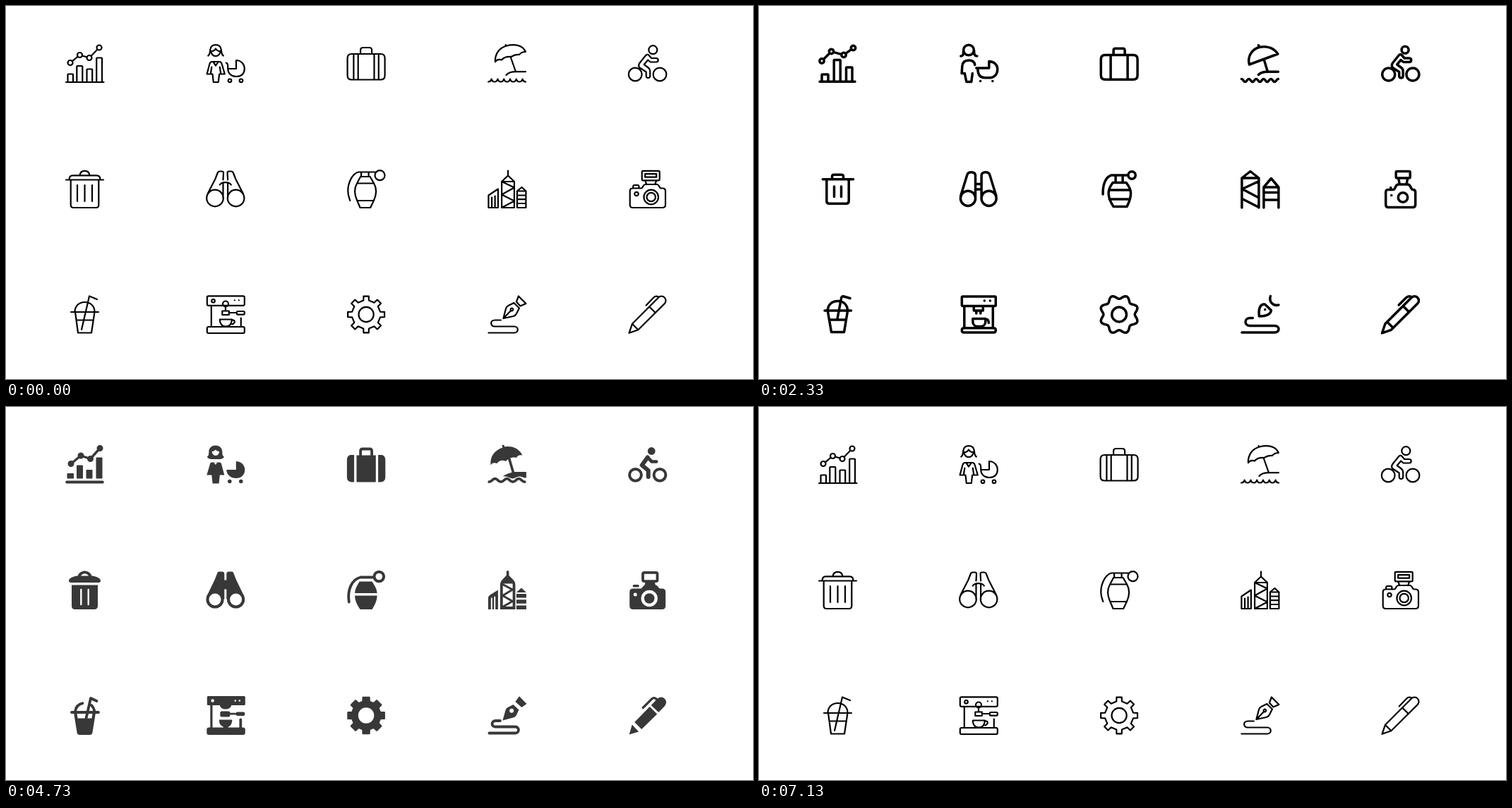
An HTML page with a canvas for the animation above (7.4 s loop, 1058x529 px).

```html
<!DOCTYPE html>
<html lang="en">
<head>
<meta charset="utf-8">
<title>Icon styles</title>
<style>
html, body { margin: 0; width: 100%; height: 100%; overflow: hidden; background: #fff; }
canvas { display: block; }
</style>
</head>
<body>
<canvas id="stage" width="1058" height="529"></canvas>
<script>
const ctx = document.getElementById('stage').getContext('2d');

// Path helpers; every icon lives in a 56 x 56 box
const o = (x, y, r) => `M${x - r} ${y}a${r} ${r} 0 1 0 ${2 * r} 0a${r} ${r} 0 1 0 ${-2 * r} 0z`;
const dot = (x, y) => `M${x} ${y}h.1`;
const box = (x, y, w, h, r = 0) =>
  `M${x + r} ${y}h${w - 2 * r}q${r} 0 ${r} ${r}v${h - 2 * r}q0 ${r} ${-r} ${r}h${2 * r - w}q${-r} 0 ${-r} ${-r}v${2 * r - h}q0 ${-r} ${r} ${-r}z`;
const bar = (x, top, w, bottom) => box(x, top, w, bottom - top, 0.8);

// Ringed points joined by lines that stop at the rings
function chain(r, pts) {
  return pts.map(([x, y], i) => {
    let d = o(x, y, r);
    if (i) {
      const [px, py] = pts[i - 1], len = Math.hypot(x - px, y - py);
      const ux = (x - px) / len * r, uy = (y - py) / len * r;
      d += `M${px + ux} ${py + uy}L${x - ux} ${y - uy}`;
    }
    return d;
  }).join('');
}

const polar = (r, a) => `${28 + r * Math.sin(a)} ${28 - r * Math.cos(a)}`;

function cog(r1, r2, inner, outer) {
  const pts = [];
  for (let k = 0; k < 8; k++) {
    const a = k * Math.PI / 4;
    pts.push(polar(r1, a - inner), polar(r2, a - outer), polar(r2, a + outer), polar(r1, a + inner));
  }
  return 'M' + pts.join('L') + 'z';
}

function wavyCog(r, amp) {
  const pts = [];
  for (let i = 0; i < 160; i++) {
    const a = i * Math.PI / 80;
    pts.push(polar(r - amp * Math.cos(8 * a), a));
  }
  return 'M' + pts.join('L') + 'z';
}

// Layers; anything after "|" in a path is mirrored left to right
function shape(d) {
  const [plain, half] = d.split('|');
  const p = new Path2D(plain);
  if (half) {
    const h = new Path2D(half);
    p.addPath(h);
    p.addPath(h, { a: -1, b: 0, c: 0, d: 1, e: 56, f: 0 });
  }
  return p;
}
const fill = d => ({ path: shape(d) });
const cut = d => ({ path: shape(d), white: true });
const line = (w, d) => ({ path: shape(d), w });
const gap = (w, d) => ({ path: shape(d), w, white: true });

const icons = [];
const icon = (thin, bold, ...solid) => icons.push([[line(2.2, thin)], [line(3.5, bold)], solid]);

// Chart
icon(
  'M1.5 54.5H55' + bar(4, 43, 7.5, 54.5) + bar(16.8, 31.5, 8, 54.5) + bar(31, 36, 7.7, 54.5) + bar(44.7, 20, 7.8, 54.5) +
    chain(3.5, [[7.5, 27], [21, 16], [34.5, 20], [48.5, 5.5]]),
  'M2.5 53.7H52.5' + bar(5.5, 43.5, 9, 53.7) + bar(22.7, 23, 9, 53.7) + bar(40, 33.5, 8.5, 53.7) +
    chain(3.2, [[5.5, 24.5], [19, 11], [36.5, 16], [50, 6]]),
  line(4.2, 'M2.8 53H53.2'),
  fill(bar(3, 40.5, 9.5, 48) + bar(16.5, 29, 9, 48) + bar(30, 35.5, 9, 48) + bar(44, 18, 9, 48)),
  line(3.4, 'M8.5 27L22.5 15.5L36 20L49.5 5'),
  fill(o(8.5, 27, 4.5) + o(22.5, 15.5, 4.5) + o(36, 20, 4.5) + o(49.5, 5, 4.5))
);

// Woman with pram
icon(
  'M3.5 17C6.5 15 6 11 6.5 8.5C7 4 10 1.7 14.2 1.7S21.5 4 22 8.5C22.4 11 22 15 25 17' +
    'M7.5 11C11 10.5 13.5 8.5 14.2 7C15 8.5 17.5 10.5 21 11M7.3 10C8 15 11 17.5 14.2 17.5S20.5 15 21.2 10' +
    'M7 43H1.8L5.5 29C6 27 7 25.5 9 25.5H19.5C21.5 25.5 22.5 27 23 29L27 43H21.5M10.5 25.5L14.3 31L18 25.5' +
    'M8.5 33L7 43H9.7L11 54.5H18L19.3 43H21.5L20 33' +
    'M28.8 27C31 27 31.5 29 31.5 35.5H43.2V23.5C50 23.5 55 29 55 35.5C55 43 50 46.5 43.2 46.5S31.5 42 31.5 35.5' +
    o(34.2, 52.3, 2.3) + o(50.2, 52.3, 2.3),
  o(14.2, 9, 7.3) + 'M3 17.5C6.5 17.5 6.8 15 6.8 9M21.7 9C21.7 15 22.5 17.5 26 17.5' +
    'M23 30C22.5 26 20 23.5 14.2 23.5S5.5 26 5 32L4.3 42H8.5L11 54H18L19.5 42' +
    'M25 34.5H43V25C50 25 55 30 55 36C55 44 50 48.3 43 48.3H37C30 48.3 27 44 27 35' + dot(30.7, 53) + dot(48, 53),
  fill('M14 1C8 1 4.5 5 4.5 10C4.5 14 4 16 2 17C3 20 7 21 14 20.5C21 21 25 20 26 17C24 16 23.5 14 23.5 10C23.5 5 20 1 14 1z'),
  cut('M9 9.5C11 9.5 13 8.5 14 7C15 8.5 17 9.5 19.3 9.5C19.3 13 17 15.3 14.2 15.3S9 13 9 9.5z'),
  fill('M8.5 25H19.5C21.5 25 22 26 22.5 28L26.5 43H20L18.8 55H9.8L8.5 43H1.5L6 28C6.5 26 7 25 8.5 25z'),
  cut('M11.5 25L14 28.5L16.5 25z'),
  fill('M43 35.5V23.5C50 23.5 55.5 29 55.5 35.5C55.5 43 50 47.5 43 47.5S29.5 43 29.5 35.5z' + o(34, 52, 2.8) + o(50, 52, 2.8))
);

// Suitcase
icon(
  box(1.5, 14.5, 53, 36.5, 6) + '|M10.3 14.5V51M16.6 14.5V51M28 5.5H23.5C21.5 5.5 20 6.5 20 9V14.5',
  box(2.2, 16, 51.8, 34.7, 6) + '|M16 16V50.7M28 6.7H22.5C21 6.7 20 7.5 20 9.5V16',
  fill(box(14.4, 15, 27.3, 38)),
  line(3.8, 'M20 16V9C20 7 21 6 23 6H33C35 6 36 7 36 9V16'),
  fill('|M11 14.5V53H8C3 53 .8 50 .8 46V22C.8 17 3 14.5 7 14.5z')
);

// Beach umbrella
icon(
  'M11.5 25.5C11 14.5 17 6 27.5 3C38 0 50.5 1.5 54.5 11.5C51 11.5 47.5 13 45.5 15.5C42 15 38 16 34 18.5C29 18 24 19 20.5 23C18 22 14 22 11.5 25.5z' +
    'M26.7 3L26.2 1.6M33.5 19.5L40.5 39.5M27 44.5C30 41 36 39.7 41 39.7H54.5' +
    'M1.7 54q4-.5 4.5-4' + 'c1.2 5.3 7.6 5.3 8.8 0'.repeat(5) + 'q.5 3.5 4.5 4',
  'M13 29.5C10 18 17 7.5 27 5C38 2.5 48 6 53.5 14.5zM26 2.2L27 5M34 23L39 39.7M26 44C29 40.5 34 39.8 39 39.8H54' +
    'M2 50' + 'c2.6 0 2.6 4 5.2 4s2.6-4 5.2-4'.repeat(5),
  fill('M5 29C4 17 10 8 22 4L21 1.5C21.5 .3 23 0 24 .8L25 3C36 1 46 6 50 15C46 14 43 15 41.5 18.5C37 17 30 19 26.5 23.5C22 21 17 22 14 26.5C10 25 7 26 5 29z'),
  line(3.6, 'M30.5 17L37.5 41'),
  fill('M22 45C29 40 37 38.5 42 38.5H55.5V47C51 47 49 45 45.5 45S39 48 36 48S28 44 22 45z'),
  line(3.8, 'M2.8 52.7' + 'c4.2 0 4.2-4.5 8.4-4.5s4.2 4.5 8.4 4.5'.repeat(3))
);

// Cyclist
const rider = 'M29.5 16L33.5 20.5H40C44 20.5 44 26 40 26H32L28.5 23L23 29.5L29 34C31 35.5 31.5 37 31.5 39V45.5C31.5 49.5 26 49.5 26 45.5V40L17.5 34.5C15 32.5 15 29.5 17 27L25 17C26.5 15 28.5 14.8 29.5 16z';
icon(
  o(10.5, 43.5, 9.4) + o(45.3, 43.5, 9.4) + o(35.6, 8.7, 6) + rider,
  o(11, 43.5, 9) + o(45.2, 43.5, 9) + o(34.4, 8.7, 5) + rider,
  line(4, o(10.8, 42.8, 8.4) + o(45.3, 42.8, 8.4)),
  fill(o(33.5, 9, 5.4)),
  line(6, 'M28 18L20 29L29 36.5V45.5'),
  line(4.6, 'M28 18L34 24H40.5')
);

// Bin
icon(
  'M1.5 15H54.5M28 22.5V45.5|M28 2.3C24.5 2.3 21.5 4.5 21 8.8M28 8.8H11C8 8.8 6 11 6 15M8.2 15V50.5C8.2 53 9.5 54.5 12 54.5H28M17.5 22.5V45.5',
  'M6.8 14.3H50|M28 7.8H23C21 7.8 20 8.5 20 10.5V14M12.3 14.5V45C12.3 47.5 13.5 48.8 16 48.8H28M23 24.5V39',
  fill('M5.5 15C5.5 11 12 8.5 18 8C20 3 24 1 28 1S36 3 38 8C44 8.5 50.5 11 50.5 15C50.5 17 49 17.5 47 17.5H9C7 17.5 5.5 17 5.5 15z' +
    'M9.5 21H46.5V50C46.5 54 45 55.5 41 55.5H15C11 55.5 9.5 54 9.5 50z'),
  cut('M22.5 8C24 5.5 26 4.7 28 4.7S32 5.5 33.5 8z'),
  gap(2.4, '|M22.8 27.5V48.5')
);

// Binoculars
icon(
  'M20 22C23 17.5 33 17.5 36 22|' + o(13.2, 41, 11.8) + 'M2.7 35L13.5 14L17 5C17.6 3.3 18.5 3 20 3H23C24.7 3 25.3 4 25.2 5.5L24.7 15M24.7 41V20',
  'M24 21H32M24 28.5H32|' + o(13.2, 41.3, 10.6) + 'M2.8 38L12 8C13.5 3 23 3 23.7 8.5V40',
  fill(box(24, 14, 8, 13) + '|' + o(13.2, 41.5, 12.6)),
  fill('|M1.5 37L13 13L16.5 4C17 2.5 18 2 19.5 2H23.5C25.5 2 26.5 3.5 26.5 5V41H5z'),
  cut('|' + o(13.2, 41.5, 8.5))
);

// Grenade
icon(
  o(47.4, 8.7, 7) + 'M42 4H17C9 6 2.2 18 2.2 31C2.2 37 4 41 5.2 44.5M21 4V10M31.5 4V10' +
    'M20 10.5L15 20C11 27 11 35 15 44L19.5 54.5H34L39 44C43 35 43 27 39 20L33.5 10.5zM15 20H39M15 44.5H39',
  o(46, 8.5, 5.2) + 'M40 8.5H17C8.5 11 4.7 22 5 35.5M23 9V19M33 9V19' +
    'M19 19H38C41 23 44.5 27 44.5 34C44.5 41 42 47 39 53H20C16 47 13 41 13 34C13 27 16 23 19 19zM14 29.5H43.5M14 42.5H43',
  line(4, o(46.2, 9, 6.8)),
  line(3.8, 'M39 10H20C8 13 1 27 3.7 45'),
  fill('M18.5 16H36.5C40 22 43 26 43.5 32.5H12C12.5 26 15 22 18.5 16zM12 36H43.5C43.5 43 40 50 36.5 55.5H19.5C15.5 50 12 43 12 36z')
);

// City
icon(
  'M29.6 2V9L20.7 17.5V54.5H38.5V17.5L29.6 9M38.5 17.5H20.7L38.5 26L20.7 36L38.5 45L20.7 54.5' +
    'M2 37L15.5 28V54.5H2zM6.7 40V54M11.2 38V54M42.5 31L49 25.5L55 31V54.5H42.5zM42.5 31H55M42.5 37H55M42.5 42.7H55M42.5 48.5H55',
  'M2.5 54.5V12.5L14.5 3L26.5 12.5V54.5M2.5 12.5H26.5M26.5 17L3 28L26.5 40.5M3 42L26.5 54' +
    'M33.5 54.5V25.5L44 13L54.5 25.5V54.5M33.5 25.5H54.5M33.5 33H54.5M33.5 43.5H54.5',
  line(3.6, 'M29.2 2.2V10'),
  fill('M18.5 21C18.5 17 20 15 23 12L27 7.5H31L36.5 13C39 16 40 17 40 21V55.5H18.5z'),
  cut(box(22.3, 19, 13.9, 32.5)),
  line(3, 'M22 20L36 27.5L22 36L36 44L22 52'),
  fill('M1.5 40C1.5 37 3 36 5 34.5L15.5 28V55.5H1.5zM41.5 31.5L48.5 25L55.5 31.5z' +
    box(41.5, 33.5, 14, 5.5) + box(41.5, 41.7, 14, 5.5) + box(41.5, 50, 14, 5.5)),
  gap(1.9, 'M6.4 40V56M10.8 38V56')
);

// Camera
icon(
  box(20, 2.3, 25, 13.5, 1.5) + box(24.5, 6.6, 16, 4.6) + 'M24.5 16L26.5 21.5M40.5 16L38.5 21.5' +
    'M7 27H19C22 27 21 21.5 25 21.5H41C45 21.5 44 27 47 27H49C52 27 53.3 28.5 53.3 31V50.5C53.3 53 52 54.5 49 54.5H7C4.5 54.5 3 53 3 50.5V31C3 28.5 4.5 27 7 27z' +
    'M7.5 27V24.5C7.5 23 8 22.5 9.5 22.5H14C15 22.5 15.7 23 15.7 24.5V27' + o(33, 39.5, 10.3) + o(33, 39.5, 6.2) + o(12.3, 35, 2.7),
  box(21.5, 3, 20, 9.5, 1.5) + 'M25 12.5L26.5 21M38 12.5L36.5 21M14 26V29' +
    'M11 29H17.5C21 29 20 21.5 25 21.5H38C43 21.5 42 29 45.5 29C48 29 49 30 49 32.5V50C49 52.5 48 54 45.5 54H10.5C8 54 7 52.5 7 50V32.5C7 30 8 29 11 29z' +
    o(31.3, 40, 6.7) + dot(15, 37),
  line(3.8, box(21.3, 3.3, 20.5, 12.3, 2)),
  fill('M25 16H38L40 24H23zM18 27L23 21.5H41L46 27z' + box(2.5, 26, 51, 29.5, 5) + box(7, 20.5, 9, 3.5, 1.5)),
  cut(o(30.5, 40, 11.7) + o(10.5, 34.5, 2.5)),
  fill(o(30.5, 40, 7.3))
);

// Iced drink
icon(
  'M8.5 24.5H47.5M14 24.5C14 16 20 10.5 28 10.5S42 16 42 24.5M45.5 6.5L34.5 2L23.5 49.5M14.5 24.5L18.5 54H37.5L42 24.5M16.2 36H40.3',
  'M9.5 22.5H47M13.8 22.5C14 14 20 9 28 9S41.5 14 42 22.5M45.5 5L36 2.2C34.5 2 33.5 3 33 5L27.5 34M13.8 23L19 53H37L42 23M16.5 35.5H39.5',
  fill('M12.5 24H43.5L39 52C38.5 54.5 37.5 55.5 35 55.5H21C18.5 55.5 17.5 54.5 17 52z'),
  cut('M17 25L18 32H38L39 25z'),
  line(3.8, 'M9.5 23.5H47.5M14.5 22C15.5 16 19 12 25 10.7M37.5 13.5C40 16 41.3 19 41.7 22M45 7.5L36.5 3.5L30 32')
);

// Coffee machine
icon(
  box(2, 1.8, 53, 13.5, 2) + box(2, 45.5, 53, 9, 2) + 'M8 15.5V45.5M50 33V45.5' + o(10.7, 8.7, 2.3) + o(28.2, 13, 4) +
    dot(41, 7.8) + dot(47, 7.8) + 'M23.5 23H33V28.5H23.5zM33 25.5H44M28.2 17V23' + box(44, 23.5, 11, 4.6, 1.5) +
    'M20 35H37C37 41 34 45 28.5 45S20 41 20 35zM37 36C42 35 42.5 40 37.5 42',
  box(4.5, 2.5, 48, 13.5, 1.5) + 'M8 16V46M48.5 16V46' + box(4.5, 47.2, 48, 6.3, 3) + dot(36.5, 8.5) + dot(44.5, 8.5) +
    'M21.5 17.5V22.5H34.5V17.5M25 23V26.5M31 23V26.5M20 34H38V38C38 42 35 45 31 45H27C23 45 20 42 20 38zM38 35C42 34 42.5 38 42.5 40',
  fill(box(2, 0.5, 54, 13, 1.5) + box(6.5, 13, 3.2, 33) + box(1.5, 45, 54.5, 10.5, 3)),
  fill('M20 13H36.5C36 17 32.5 19 28.2 19S20.5 17 20 13z' + box(20.5, 22, 14, 8, 2) + box(43, 23, 12.5, 5.5, 2) +
    'M19 34H37.5C37.5 40 35 43 32 44V46H25V44C22 43 19 40 19 34z'),
  line(2.8, 'M34 25.7H44'),
  line(3.8, 'M49.5 34V46'),
  cut(o(9.8, 7, 2.2) + o(42, 7, 1.3) + o(48, 7, 1.3))
);

// Gear
icon(
  cog(20.3, 26.2, 0.19, 0.14) + o(28, 28, 10.6),
  wavyCog(24.9, 2.7) + o(28, 28, 10.4),
  fill(cog(20.3, 26, 0.23, 0.17)),
  line(2.4, cog(20.3, 26, 0.23, 0.17)),
  cut(o(28, 28, 11.2))
);

// Nib drawing a line
icon(
  'M23 33.5L26.5 20C27 18 28 16.5 30 15.5L38 11.5L45.5 19L41.5 27C40.5 29 39 30 37 30.5zM23 33.5L33.5 22.8' + o(35, 21, 1.8) +
    'M41.5 10L44.5 2L55 12.5L47 16zM19.5 36H11C4 36 4 45 11 45H38.5C45 45 45 54 38.5 54H2',
  'M27 30.5C26 22 27.5 15 33 13.5H35L44 22C43.5 28 36 31 27 30.5z' + dot(35.3, 21) +
    'M43 2C40.5 9 46 16.5 54.5 14.5M18 33H14C5.5 33 5.5 44 14 44H49C56.5 44 56.5 53.5 49 53.5H2.5',
  fill('M22 35L26 21C26.5 19 27.5 17.5 29.5 16.5L37 12.5L45 20L41.5 27.5C40.5 29.5 39 30.5 37 31zM40 8.5L45.5 .8L56 11.5L49 16.5z'),
  cut(o(34.7, 21.3, 3)),
  line(3.8, 'M18.5 35.5H12C5.5 35.5 5.5 44 12 44H40C46 44 46 53 40 53H3')
);

// Pen
const pen = 'M1.8 54.3L6.2 41.3L43.4 4A6 6 0 0 1 52 12.6L14.7 49.8z';
icon(
  pen + 'M6.2 41.3L14.7 49.8M30.5 17L39 25.5M26 15L36 4.5C38 2 40.5 1.5 43.5 3',
  pen + 'M9 38.5L17.5 47M31.5 16L40 24.5M25.5 14.5L35.5 4.5C38 2 40.5 1.7 43 3',
  fill('M2 55L6 41L15.5 51zM9.5 37.5L31 15.5L41.5 26L19.5 47.5zM33 13.5L40.5 5.5C45 1 49 1 52 4S55.5 11 51.5 15.5L43.5 23.5z'),
  line(3.2, 'M21.5 17L33.5 5C36 2.5 38 2.5 41 5')
);

const STEP = 1000 / 15, LOOP = 7400;
const swaps = [25, 61, 97];
const inks = [0, 0, 56];

function ease(v) {
  v = Math.max(0, Math.min(1, v));
  return v * v * (3 - 2 * v);
}

// Style index and visibility (0..1) at a given step
function pose(step) {
  let style = 0, seen = 1;
  swaps.forEach((start, i) => {
    const n = step - start;
    if (n < 1) return;
    style = n < 5 ? i : (i + 1) % 3;
    seen = n < 5 ? 1 - ease(n / 5 + 0.087) : ease((n - 5) / 5 + 0.087);
  });
  return [style, seen];
}

function draw(ms) {
  const [style, seen] = pose(Math.floor((ms % LOOP + 4) / STEP));
  const tone = Math.round(255 - (255 - inks[style]) * seen);
  const ink = `rgb(${tone},${tone},${tone})`;
  const size = 0.36 + 0.64 * seen;
  ctx.fillStyle = '#fff';
  ctx.fillRect(0, 0, 1058, 529);
  ctx.lineCap = ctx.lineJoin = 'round';
  icons.forEach((layers, i) => {
    // The icons are listed row by row, five to a row
    ctx.save();
    ctx.translate(111.5 + 199.3 * (i % 5), 81.5 + 178 * Math.floor(i / 5));
    ctx.scale(size, size);
    ctx.translate(-28, -28);
    for (const { path, w, white } of layers[style]) {
      ctx.fillStyle = ctx.strokeStyle = white ? '#fff' : ink;
      if (w) {
        ctx.lineWidth = w;
        ctx.stroke(path);
      } else ctx.fill(path);
    }
    ctx.restore();
  });
}

const begin = performance.now();
function tick() {
  draw(performance.now() - begin);
  requestAnimationFrame(tick);
}
tick();
</script>
</body>
</html>
```
